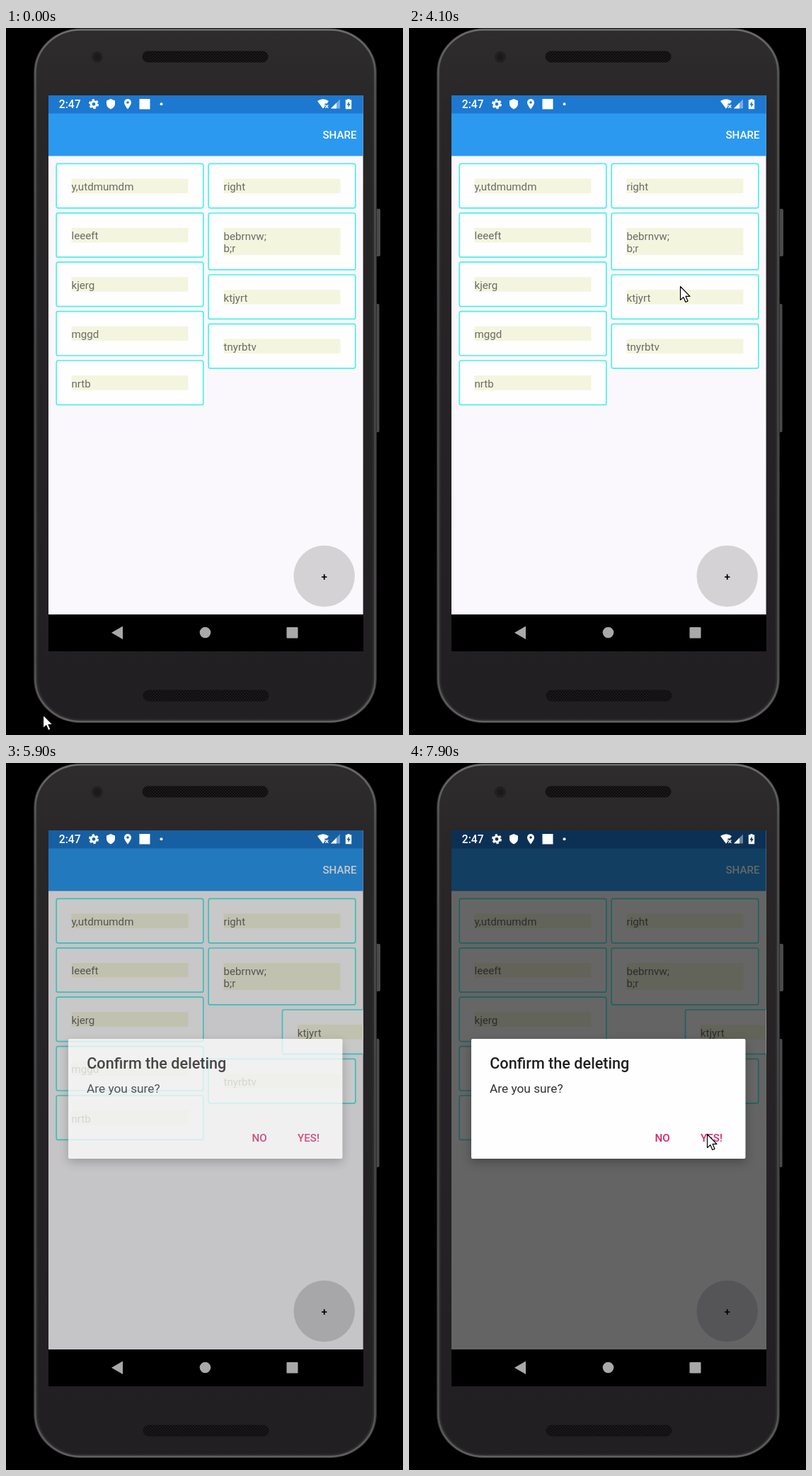
An HTML page for the animation above (8000 ms loop, 561 px wide and 997 px high).

```html
<!DOCTYPE html>
<html lang="en">
<head>
<meta charset="utf-8">
<title>Card list</title>
<style>
html, body { margin: 0; width: 100%; height: 100%; overflow: hidden; background: #000; }
svg { display: block; width: 561px; height: 997px; font-family: Roboto, sans-serif; font-size: 15.15px; }
.medium { font-weight: 500; }
.card rect { fill: #fefefe; stroke: #4ff0ea; stroke-width: 1.7; }
.card rect.field { fill: #f4f5de; stroke: none; }
.card text { fill: #6b6b69; }
#dialog { filter: drop-shadow(0 5px 7px rgba(0,0,0,.28)); }
</style>
</head>
<body>
<svg viewBox="0 0 561 997">
  <defs>
    <linearGradient id="rim" x2="0" y2="1">
      <stop offset="0" stop-color="#6e6d6e"/>
      <stop offset=".08" stop-color="#545354"/>
      <stop offset=".5" stop-color="#464546"/>
      <stop offset=".92" stop-color="#504f50"/>
      <stop offset="1" stop-color="#626162"/>
    </linearGradient>
    <linearGradient id="body" x2="0" y2="1">
      <stop offset="0" stop-color="#2e2c2d"/>
      <stop offset=".12" stop-color="#282627"/>
      <stop offset="1" stop-color="#211f22"/>
    </linearGradient>
    <pattern id="mesh" width="4" height="4" patternUnits="userSpaceOnUse">
      <rect width="4" height="4" fill="#0d0d0d"/>
      <circle cx="1" cy="1" r=".8" fill="#2b292a"/>
      <circle cx="3" cy="3" r=".8" fill="#2b292a"/>
    </pattern>
    <clipPath id="screen"><rect x="60" y="95" width="444.600" height="732"/></clipPath>
  </defs>

  <rect width="561" height="997"/>
  <g fill="#4b4a4b">
    <rect x="522" y="255" width="7" height="67" rx="2"/>
    <rect x="522" y="389" width="5.500" height="181" rx="2"/>
  </g>
  <rect x="39" y=".5" width="485" height="979.500" rx="66" ry="62" fill="#2d2c2d"/>
  <rect x="41.500" y="2.500" width="480" height="975.500" rx="64" ry="60" fill="#2d2c2d" stroke="url(#rim)" stroke-width="2.500"/>
  <rect x="45" y="5.500" width="473" height="969" rx="60" ry="57" fill="url(#body)"/>
  <rect x="193" y="33" width="177" height="15" rx="7.500" fill="url(#mesh)" stroke="#121112"/>
  <rect x="194" y="934" width="177" height="15" rx="7.500" fill="url(#mesh)" stroke="#121112"/>
  <circle cx="129" cy="41" r="8" fill="#222021"/>
  <circle cx="129" cy="41" r="4.500" fill="#1a191c"/>

  <g clip-path="url(#screen)">
    <rect x="60" y="95" width="445" height="732" fill="#faf8fc"/>
    <rect x="60" y="95" width="445" height="26" fill="#1d78cf"/>
    <rect x="60" y="120.500" width="445" height="60" fill="#2b99f0"/>
    <text class="medium" x="447.400" y="155.500" fill="#fff">SHARE</text>
    <g id="cards"></g>
    <circle cx="449.700" cy="773" r="43.200" fill="#d4d2d5"/>
    <text class="medium" x="449.700" y="778.500" text-anchor="middle">+</text>
    <rect id="scrim" x="60" y="95" width="445" height="732"/>
  </g>

  <g fill="#fff">
    <text class="medium" x="74.800" y="113.300" style="font-size:15.6px">2:47</text>
    <circle cx="124" cy="107.300" r="3.900" fill="none" stroke="#fff" stroke-width="3"/>
    <circle cx="124" cy="107.300" r="5.900" fill="none" stroke="#fff" stroke-width="2.300" stroke-dasharray="3.300 2.878"/>
    <path d="M148 100l6 2.500v4.500q0 5-6 7.500q-6-2.500-6-7.500v-4.500z"/>
    <path fill-rule="evenodd" d="M172 100a5 5 0 0 1 5 5c0 3.500-5 9.500-5 9.500s-5-6-5-9.500a5 5 0 0 1 5-5zm0 3.200a1.800 1.800 0 1 0 0 3.600a1.800 1.800 0 1 0 0-3.600z"/>
    <rect x="188.500" y="100" width="15" height="14.500"/>
    <circle cx="219.500" cy="107.300" r="2"/>
    <path d="M440 103q8-5.500 16 0l-2.300 3.500h-3.200v4.200l-2.500 3.100z"/>
    <path d="M451.300 108.500l4 4.200m0-4.200l-4 4.200" stroke="#fff" stroke-width="1.300"/>
    <path d="M472 100.500v13h-13z" opacity=".4"/>
    <path d="M467 105.500v8h-8z"/>
    <path fill-rule="evenodd" d="M482.500 100h3v1.300h2.700v13h-8.400v-13h2.700zm2.300 3.500l-3.300 5h2v3.700l3.200-5.200h-1.900z"/>
  </g>

  <rect x="60" y="827" width="445" height="52"/>
  <g fill="#a9a9a9">
    <path d="M149 852.700l16-9.300v18.600z"/>
    <circle cx="281.500" cy="852.500" r="7.800"/>
    <rect x="396.500" y="845" width="16" height="15.500" rx="1"/>
  </g>

  <g id="dialog">
    <rect x="88" y="389" width="387.500" height="169" rx="2" fill="#fefefe"/>
    <g fill="#202020">
      <text class="medium" x="114.200" y="431.300" style="font-size:21.65px">Confirm the deleting</text>
      <text x="114" y="464.500" style="font-size:17.3px" fill="#333">Are you sure?</text>
    </g>
    <g class="medium" fill="#d32b70">
      <text x="347.500" y="533.500">NO</text>
      <text x="412" y="533.500">YES!</text>
    </g>
  </g>

  <path id="cursor" d="M.5 .5V19.500L4.800 15.600L7.800 22.500L11 21.100L8 14.300H14z" fill="#fff" stroke="#000" stroke-width="1.200" stroke-linejoin="round"/>
</svg>
<script>
const LOOP = 8000, STEP = 100;
const $ = id => document.getElementById(id);

function card(x, y, ...lines) {
  const extra = (lines.length - 1) * 17.5;
  const text = lines.map((s, i) =>
    `<text x="${x + 21.3}" y="${y + 38 + i * 17.5}">${s}</text>`).join('');
  return `<g class="card"><rect x="${x}" y="${y + .4}" width="207.600" height="${62.4 + extra}" rx="2.500"/>` +
    `<rect class="field" x="${x + 21.3}" y="${y + 21.5}" width="165" height="${20.5 + extra}"/>${text}</g>`;
}

const left = ['y,utdmumdm', 'leeeft', 'kjerg', 'mggd', 'nrtb'];
$('cards').innerHTML =
  left.map((s, i) => card(71.2, 191 + i * 69.4, s)).join('') +
  card(286.2, 191, 'right') +
  card(286.2, 260.6, 'bebrnvw;', 'b;r') +
  `<g id="swiped">${card(286.2, 347.6, 'ktjyrt')}</g>` +
  card(286.2, 417, 'tnyrbtv');

// [time, x, y]; the pointer is hidden between the two paths
const reach = [[0, 52, 968], [1200, 52, 968], [1300, 445, 200], [1400, 442, 179],
  [1600, 442, 179], [3900, 383, 364], [5000, 383, 364], [5600, 511, 368]];
const confirm = [[6600, 480, 440], [7000, 431, 515], [7500, 421, 523], [8000, 421, 523]];

const ease = p => p * p * (3 - 2 * p);

function along(path, t) {
  const i = Math.max(1, path.findIndex(k => k[0] >= t));
  const [a, b] = [path[i - 1], path[i]];
  const p = ease((t - a[0]) / (b[0] - a[0]));
  return [a[1] + (b[1] - a[1]) * p, a[2] + (b[2] - a[2]) * p];
}

function draw(time) {
  const t = Math.floor((time % LOOP) / STEP) * STEP;
  const shown = t <= 5600 || t >= 6600;
  $('cursor').style.display = shown ? '' : 'none';
  if (shown) {
    const [x, y] = along(t <= 5600 ? reach : confirm, t);
    $('cursor').setAttribute('transform', `translate(${x} ${y})`);
  }
  const drag = along(reach, Math.min(t, 5600))[0] - 383;
  const shift = t < 5000 ? 0 : Math.min(104.3, drag);
  $('swiped').setAttribute('transform', `translate(${shift} 0)`);
  $('scrim').setAttribute('opacity', t < 5900 ? 0 : t < 6000 ? .21 : t < 6100 ? .555 : .595);
  $('dialog').setAttribute('opacity', t < 5900 ? 0 : t < 6000 ? .76 : 1);
}

const start = performance.now();
function tick() {
  draw(performance.now() - start);
  requestAnimationFrame(tick);
}
tick();
</script>
</body>
</html>
```
